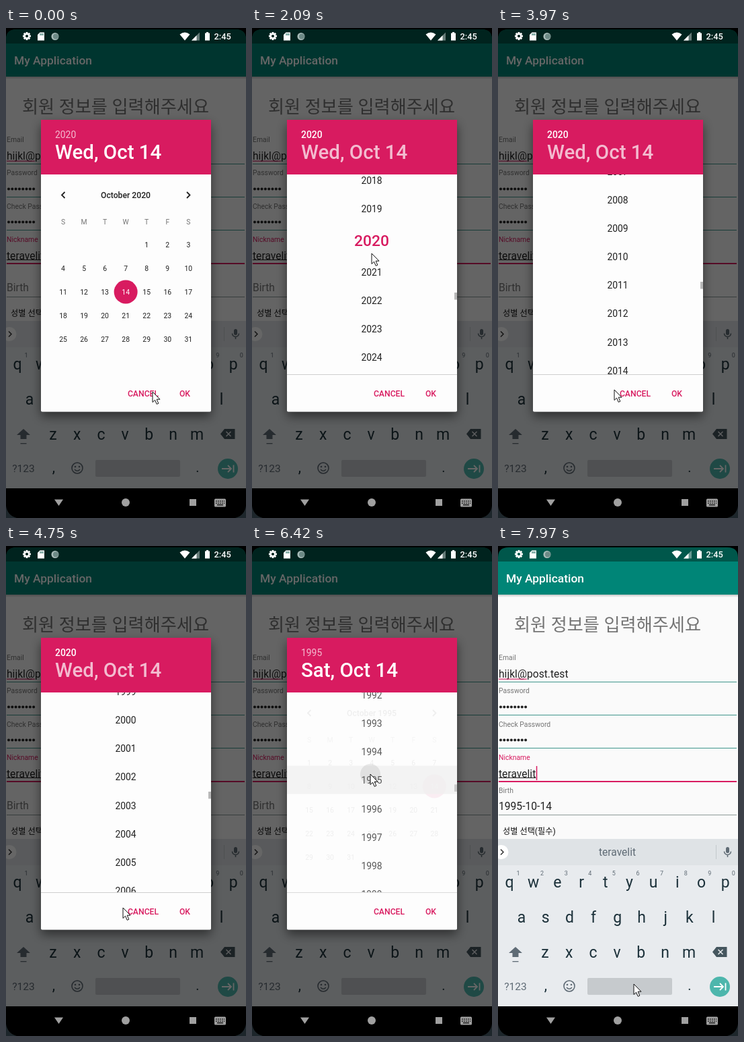
Animation, 357 px wide and 726 px high, one loop 8 s. Source, as an HTML page:

```html
<!DOCTYPE html>
<html lang="ko">
<head>
<meta charset="utf-8">
<title>Date picker</title>
<style>
html, body { margin: 0; width: 100%; height: 100%; overflow: hidden; background: #000; }
svg { display: block; width: 357px; height: 726px; font-family: Roboto, "Noto Sans CJK KR", sans-serif; }
</style>
</head>
<body>
<svg id="stage" viewBox="0 0 357 726"></svg>
<script>
const ACCENT = '#d81b60', TEAL = '#008577', INK = '#212121', HINT = '#757575';
const EMAIL = ['hijkl', '@post.test'], NICK = 'teravelit';

const text = (x, y, size, str, fill = INK, extra = '') =>
  `<text x="${x}" y="${y}" font-size="${size}" fill="${fill}" ${extra}>${str}</text>`;
const mid = (x, y, size, str, fill, extra = '') => text(x, y, size, str, fill, `text-anchor="middle" ${extra}`);
const rect = (x, y, w, h, fill, extra = '') =>
  `<rect x="${x}" y="${y}" width="${w}" height="${h}" fill="${fill}" ${extra}/>`;
const disc = (x, y, r, fill, extra = '') => `<circle cx="${x}" cy="${y}" r="${r}" fill="${fill}" ${extra}/>`;
const path = (d, fill, extra = '') => `<path d="${d}" fill="${fill}" ${extra}/>`;
const line = (d, stroke, width = 1.5) => path(d, 'none', `stroke="${stroke}" stroke-width="${width}"`);
const group = (id, body, extra = '') => `<g id="${id}" ${extra}>${body}</g>`;
const MEDIUM = 'font-weight="500"';

function form() {
  const label = (y, str, fill = HINT) => text(1, y, 10.4, str, fill);
  const rule = (y, fill, h = 1) => rect(1, y, 354, h, fill);
  const bullets = y => Array.from({ length: 8 }, (_, i) => disc(4 + i * 5.3, y, 2, INK)).join('');
  return rect(0, 72, 357, 362, '#fafafa') + rect(0, 72, 357, 4, 'url(#barShadow)') +
    rect(0, 23, 357, 49, TEAL) + text(12, 54, 17.4, 'My Application', '#fff', MEDIUM) +
    text(24, 126, 26.2, '회원 정보를 입력해주세요', HINT) +
    label(169, 'Email') + text(1, 195, 15.65, EMAIL.join('')) +
    rect(1, 196.5, 42, 1.5, ACCENT, 'opacity=".75"') + rule(201, '#3f968c') +
    label(218, 'Password') + bullets(238.5) + rule(250, '#3f968c') +
    label(267.5, 'Check Password') + bullets(287.5) + rule(299, '#3f968c') +
    label(317, 'Nickname', ACCENT) + text(1, 342.5, 15.65, NICK, INK, 'id="nick"') +
    rect(1, 343, 66, 1, INK, 'id="composing"') + rect(68, 326, 1.5, 21, ACCENT, 'id="caret"') + rule(348, ACCENT, 2) +
    text(1, 390, 15.65, 'Birth', HINT, 'id="birthLabel"') +
    text(1, 391, 15.65, '1995-10-14', INK, 'id="birthValue"') + rule(398, '#8d9a98') +
    text(7, 427, 12.2, '성별 선택(필수)', '#111');
}

function keyboard() {
  const ink = '#1c313a', soft = '#5f6b75';
  const row = (str, x, y) => [...str].map((c, i) => mid(x + i * 35.7, y, 23, c, ink)).join('');
  const digits = [...'1234567890'].map((c, i) => mid(30 + i * 35.6, 488, 9, c, soft)).join('');
  return rect(0, 434, 357, 248, '#e8ebee') + rect(0, 434, 357, 39, '#dfe3e6') +
    disc(5, 453.5, 10.5, '#fff') + line('M4 449.5l4 4l-4 4', '#333') +
    mid(177.5, 459, 15.6, NICK, soft) + rect(324, 443, 1, 21, '#c3c8cb') +
    rect(339, 446, 5, 9, soft, 'rx="2.5"') + line('M336.5 452.5a5 5 0 0 0 10 0M341.5 457.5v3.5', soft) +
    row('qwertyuiop', 17, 506) + digits + row('asdfghjkl', 35, 558) + row('zxcvbnm', 70, 609.5) +
    path('M26 594l10 9h-5.5v6h-9v-6h-5.5z', soft) + rect(21.5, 615, 9, 1.3, soft) +
    path('M325 594h15.5v15h-15.5l-6-7.500z', ink, 'opacity=".8"') + line('M327.500 598l7 7m0-7l-7 7', '#e8ebee') +
    mid(26, 658, 15.5, '?123', soft) + mid(71, 658, 22, ',', ink) + mid(285, 658, 20, '.', ink) +
    `<circle cx="106" cy="652" r="8" fill="none" stroke="${soft}" stroke-width="1.6"/>` +
    disc(103, 650, 1.3, soft) + disc(109, 650, 1.3, soft) + line('M102 654q4 4.500 8 0', soft) +
    rect(133, 640, 126, 25, '#c6cacd', 'rx="2"') + disc(330, 653, 15, '#4db6ac') +
    line('M321 653h14m-5-5l5 5l-5 5M338.500 647.500v11', '#fff', 1.8);
}

function statusBar() {
  const teeth = Array.from({ length: 8 }, (_, i) =>
    rect(29.600, 6, 2.8, 3, '#fff', `transform="rotate(${i * 45} 31 12)"`)).join('');
  return teeth + `<circle cx="31" cy="12" r="3.3" fill="none" stroke="#fff" stroke-width="2.4"/>` +
    path('M50.500 6.500h6.500v12h-10v-8.500z', '#fff') + line('M51 8v3m2-3v3m2-3v3', '#00574b', 0.9) +
    disc(73, 12.500, 5.5, '#a9bcb9') + disc(74, 12.500, 4, '#6d8a86') +
    path('M258.500 9.500q7.500-6 15 0l-7.500 9z', '#fff') +
    path('M288 6.500v12h-12z', '#fff', 'opacity=".4"') + path('M283.500 11v7.500h-7.500z', '#fff') +
    path('M298 6h3v1.500h2v11h-7v-11h2z', '#fff') + text(309.500, 17, 12.8, '2:45', '#fff', MEDIUM);
}

function navBar() {
  const grey = '#a0a0a0';
  const keys = line('M312 701h13m-13 3h13', '#000', 1.3).replace('/>', ' stroke-dasharray="1.500 1.500"/>');
  return rect(0, 682, 357, 44, '#000') + path('M72 698.500h13l-6.500 9.500z', grey) + disc(178, 703, 6, grey) +
    rect(273, 698, 10, 10, grey) + rect(310, 697.500, 17, 12, grey, 'rx="1.500"') + keys + rect(314, 706, 9, 1.2, '#000');
}

function month(year, firstDay) {
  const x = col => 85 + col * 31.05;
  let out = line('M87.500 243l-4.500 4.500l4.500 4.500M269 243l4.500 4.500l-4.500 4.500', '#222', 1.8) +
    mid(178, 251.5, 12.2, 'October ' + year, INK, MEDIUM);
  [...'SMTWTFS'].forEach((d, i) => out += mid(x(i), 291, 10.4, d, HINT));
  for (let day = 1; day <= 31; day++) {
    const cell = day - 1 + firstDay, cx = x(cell % 7), cy = 321 + Math.floor(cell / 7) * 35;
    const chosen = day === 14;
    if (chosen) out += disc(cx, cy, 17.5, ACCENT);
    out += mid(cx, cy + 3.7, 10.4, day, chosen ? '#fff' : INK);
  }
  return out;
}

function years() {
  let out = '';
  for (let y = 1984; y <= 2027; y++) {
    const cy = y < 2020 ? 226 + (y - 2018) * 42.1 : y > 2020 ? 361.5 + (y - 2021) * 42.2 : 315;
    out += y === 2020 ? mid(178, cy + 8, 22.8, y, ACCENT, MEDIUM) : mid(178, cy + 5, 13.9, y);
  }
  return out;
}

function dialog() {
  const button = (x, str) => mid(x, 546, 12.2, str, ACCENT, MEDIUM);
  return rect(52, 136, 253, 432.5, '#fdfdfd', 'rx="2" filter="url(#shadow)"') +
    rect(52, 136, 253, 81, ACCENT) +
    text(73, 163, 13.9, '2020', '#fff', 'id="headYear"') +
    text(73, 194, 29.5, 'Wed, Oct 14', '#fff', `id="headDate" ${MEDIUM}`) +
    group('month2020', month(2020, 4)) + group('month1995', month(1995, 0)) +
    group('list', rect(52, 325.5, 253, 42, '#efefef', 'id="rowPress"') +
      group('scroll', years()) + rect(301, 0, 4, 10.5, '#b8b8b8', 'id="thumb"') +
      rect(52, 513, 253, 1, '#cfcfcf'), 'clip-path="url(#listClip)"') +
    button(204, 'CANCEL') + button(266, 'OK');
}

document.getElementById('stage').innerHTML = `<defs>
  <linearGradient id="barShadow" x2="0" y2="1"><stop stop-opacity=".22"/><stop offset="1" stop-opacity="0"/></linearGradient>
  <filter id="shadow" x="-20%" y="-20%" width="140%" height="140%">
    <feDropShadow dx="0" dy="7" stdDeviation="8" flood-opacity=".5"/></filter>
  <clipPath id="listClip"><rect x="52" y="217" width="253" height="297"/></clipPath>
  <clipPath id="screen"><path d="M0 726V17Q0 2 16 2H341Q357 2 357 17V726z"/></clipPath></defs>` +
  group('', rect(0, 0, 357, 23, '#00574b') + form() + keyboard() +
    rect(0, 0, 357, 682, '#000', 'id="scrim"') + statusBar() + navBar(), 'clip-path="url(#screen)"') +
  path('M0 708Q2 722 16 726H0zM357 708Q355 722 341 726H357z', '#1d262b') +
  group('dialog', dialog()) + disc(0, 0, 15, '#777', 'id="touch"') +
  path('M0 0V15.500L3.600 12.200L6.200 18.300L8.800 17.200L6.200 11.200H11z', '#fff',
    'id="cursor" stroke="#111" stroke-linejoin="round"');

const el = id => document.getElementById(id);
const set = (id, attrs) => { for (const k in attrs) el(id).setAttribute(k, attrs[k]); };
const clamp = v => Math.min(1, Math.max(0, v));
const ramp = (t, from, to) => clamp((t - from) / (to - from));
const smooth = p => p * p * (3 - 2 * p);

// Each key: time, then the values eased to at that time.
function track(keys, t) {
  const i = keys.findIndex(k => k[0] > t);
  if (i === 0) return keys[0].slice(1);
  if (i < 0) return keys[keys.length - 1].slice(1);
  const a = keys[i - 1], b = keys[i], p = smooth(ramp(t, a[0], b[0]));
  return a.slice(1).map((v, j) => v + (b[j + 1] - v) * p);
}

const POINTER = [[30, 218, 539], [820, 91, 160], [1450, 91, 160], [2090, 178, 334], [2280, 178, 334],
  [2600, 177, 290], [3170, 176, 530], [3520, 172, 300], [3970, 173, 536], [4300, 176, 290],
  [4750, 174, 536], [4830, 174, 560], [5150, 178, 290], [5480, 178, 536], [5700, 190, 371],
  [5860, 176, 338], [6430, 176, 338], [6890, 277, 559], [7030, 277, 559], [7130, 274, 541],
  [7700, 274, 541], [7770, 247, 570], [7970, 202, 649]];
const SCROLL = [[2600, 0], [3170, 217.500], [3520, 235], [3970, 450], [4300, 530], [4750, 790], [5150, 850], [5600, 1089.7]];

function touchAlpha(t) {
  if (t >= 1160 && t < 1230 || t >= 7350 && t < 7430) return 0.35;
  return t >= 5930 ? 0.35 * (1 - ramp(t, 6200, 6600)) : 0;
}

function draw(t) {
  const [x, y] = track(POINTER, t), [scroll] = track(SCROLL, t);
  set('cursor', { transform: `translate(${x} ${y})` });
  set('touch', { cx: x, cy: y, opacity: touchAlpha(t) });

  const open = ramp(t, 1450, 1750), close = ramp(t, 6345, 6645);
  set('month2020', { opacity: 1 - open });
  set('month1995', { opacity: close * close });
  set('list', { opacity: open * open * (1 - close) });
  set('scroll', { transform: `translate(0 ${scroll})` });
  set('thumb', { y: 392 - scroll * 0.0355 });
  set('rowPress', { opacity: ramp(t, 6060, 6160) });

  const picked = t >= 6330, yearView = t >= 1450 && !picked;
  el('headYear').textContent = picked ? '1995' : '2020';
  el('headDate').textContent = picked ? 'Sat, Oct 14' : 'Wed, Oct 14';
  set('headYear', { opacity: yearView ? 1 : 0.7, 'font-weight': yearView ? 500 : 400 });
  set('headDate', { opacity: yearView ? 0.7 : 1 });

  set('dialog', { opacity: 1 - ramp(t, 7720, 7860) });
  set('scrim', { opacity: 0.6 * (1 - ramp(t, 7750, 7950)) });
  const lift = smooth(ramp(t, 7740, 7930));
  set('birthLabel', { y: 390 - 24 * lift, 'font-size': 15.65 - 5.25 * lift });
  set('birthValue', { opacity: t >= 7730 ? 1 : 0 });
  set('caret', { opacity: t >= 7900 ? 1 : 0 });
}

const nickWidth = el('nick').getComputedTextLength();
set('composing', { width: nickWidth });
set('caret', { x: nickWidth + 1.5 });

function frame() {
  draw(performance.now() % 8000);
  requestAnimationFrame(frame);
}
frame();
</script>
</body>
</html>
```
